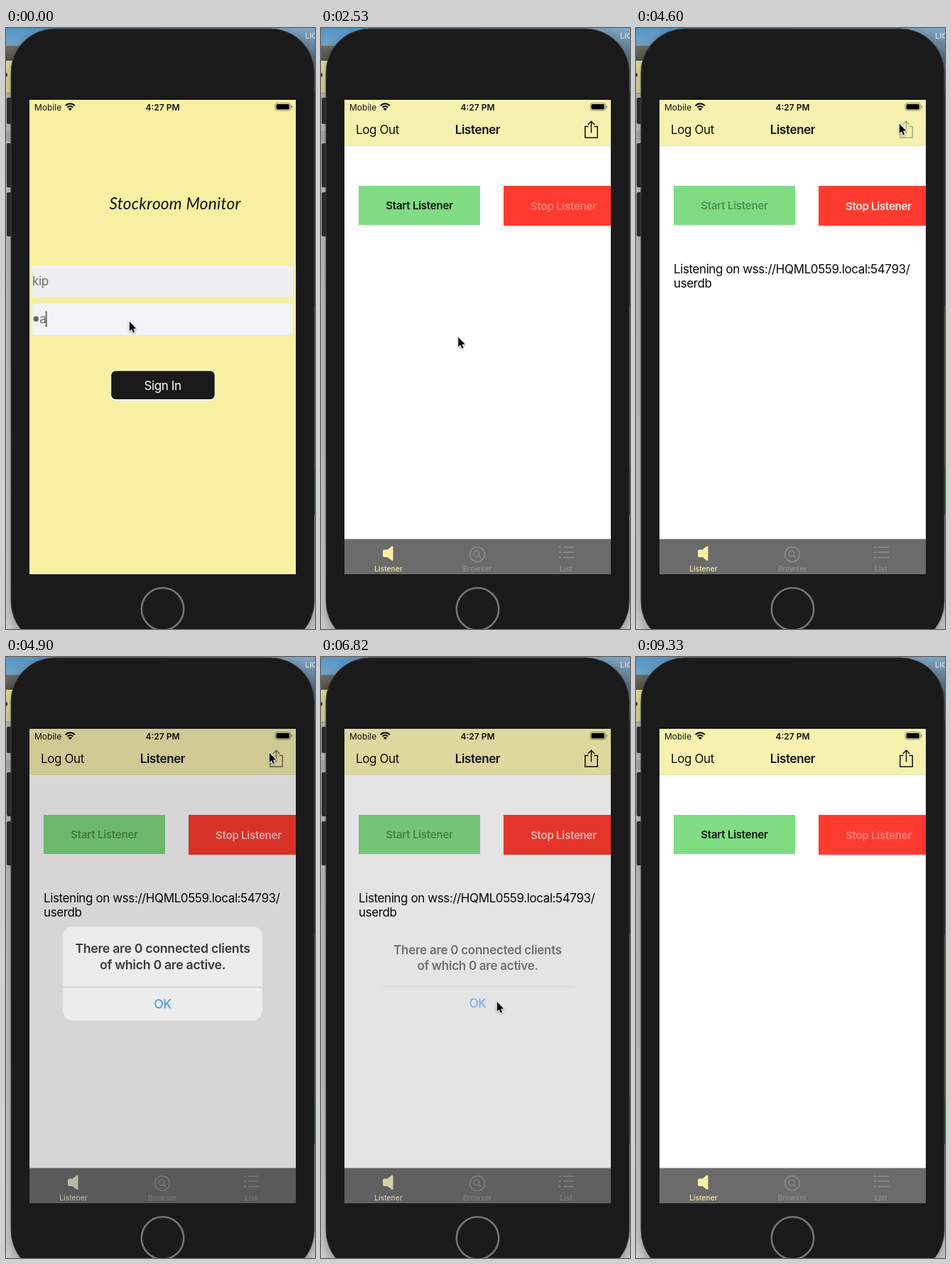
An HTML page with a canvas for the animation above (9430 ms loop, 435 by 845 pixels).

```html
<!DOCTYPE html>
<html lang="en">
<head>
<meta charset="utf-8">
<title>Phone app walkthrough</title>
<style>
html, body { margin: 0; width: 435px; height: 845px; overflow: hidden; background: #c6c6c6; }
canvas { display: block; }
</style>
</head>
<body>
<canvas id="stage" width="435" height="845"></canvas>
<script>
const ctx = document.getElementById('stage').getContext('2d');
const LOOP = 9430;
const SANS = 'Inter, "Open Sans", sans-serif';
const HAND = 'italic 400 22.5px Lato, "Open Sans", sans-serif';

// Cursor moves: start, end, number of steps, target point
const START = [174, 412];
const MOVES = [
  [1340, 1940, 5, [208, 494]],
  [2530, 2820, 3, [152, 263]],
  [4010, 4600, 5, [371, 134]],
  [5480, 6080, 5, [248, 484]],
  [7260, 7700, 4, [348, 231]],
  [8590, 9040, 4, [406, 838]]
];
const PASSWORD = 'password';
const KEY_TIMES = [300, 450, 600, 900, 1050, 1200];

const mix = (a, b, p) => a + (b - a) * p;
const ease = p => p * p * (3 - 2 * p);
const within = (t, a, b) => t >= a && t < b;

function cursorAt(t) {
  let at = START;
  for (const [from, to, steps, goal] of MOVES) {
    if (t < from) break;
    const gap = (to - from) / (steps - 1);
    const step = Math.min(steps, Math.floor((t - from + 5) / gap) + 1);
    const p = ease(step / steps);
    at = [mix(at[0], goal[0], p), mix(at[1], goal[1], p)];
  }
  return at;
}

function rect(x, y, w, h, color) {
  ctx.fillStyle = color;
  ctx.fillRect(x, y, w, h);
}

function round(x, y, w, h, r, color) {
  ctx.beginPath();
  ctx.roundRect(x, y, w, h, r);
  ctx.fillStyle = color;
  ctx.fill();
}

function line(points, color, width) {
  ctx.beginPath();
  points.forEach(([x, y], i) => i ? ctx.lineTo(x, y) : ctx.moveTo(x, y));
  ctx.strokeStyle = color;
  ctx.lineWidth = width;
  ctx.stroke();
}

function ring(x, y, r, color, width) {
  ctx.beginPath();
  ctx.arc(x, y, r, 0, 7);
  ctx.strokeStyle = color;
  ctx.lineWidth = width;
  ctx.stroke();
}

function dot(x, y, r, color) {
  ctx.beginPath();
  ctx.arc(x, y, r, 0, 7);
  ctx.fillStyle = color;
  ctx.fill();
}

function text(str, x, y, size, color, { weight = 400, align = 'left', track = 0, font } = {}) {
  ctx.font = font || `${weight} ${size}px ${SANS}`;
  ctx.letterSpacing = track + 'px';
  ctx.textAlign = align;
  ctx.fillStyle = color;
  ctx.fillText(str, x, y);
}

const body = (str, x, y, color, more) => text(str, x, y, 17, color, { track: -0.4, ...more });

function vertical(y0, y1, ...colors) {
  const g = ctx.createLinearGradient(0, y0, 0, y1);
  colors.forEach((c, i) => g.addColorStop(i / (colors.length - 1), c));
  return g;
}

function desktop() {
  rect(0, 0, 435, 845, vertical(90, 845, '#c6c6c6', '#cfcfcf', '#d8d8d8'));
  rect(0, 0, 220, 25, vertical(0, 25, '#5497c8', '#74a4c8'));
  rect(220, 0, 215, 90, vertical(0, 90, '#7fa6c6', '#5d7183', '#46515c'));
  rect(0, 25, 60, 21, vertical(25, 46, '#706f65', '#55544d'));
  rect(0, 46, 10, 46, '#eae4a0');
  rect(0, 91, 10, 1, '#a5a17c');
  dot(-1, 66, 3, '#111');
  rect(0, 145, 7, 14, '#b8b8b8');
  text('LIC', 421, 15, 11, '#d9dde0', { weight: 600 });
}

function phone() {
  ctx.save();
  ctx.shadowColor = 'rgba(0,0,0,.4)';
  ctx.shadowBlur = 22;
  ctx.shadowOffsetY = 8;
  round(7, 1, 427, 867, 62, '#1a1a1a');
  ctx.restore();
  for (const [y, h] of [[98, 37], [162, 62], [231, 62]]) round(1, y, 10, h, 2, '#2a2a2a');
  round(7, 1, 427, 867, 62, '#1a1a1a');
  ctx.strokeStyle = '#3d4246';
  ctx.lineWidth = 1;
  ctx.stroke();
  rect(434, 90, 1, 300, '#222423');
  rect(434, 390, 1, 230, '#4c4b35');
  rect(434, 620, 1, 65, '#254528');
  ring(220.5, 817, 29.7, '#747474', 2.6);
}

function statusBar() {
  text('Mobile', 40, 115.5, 12, '#111');
  text('4:27 PM', 220.5, 115.5, 12, '#111', { weight: 600, align: 'center' });
  ctx.strokeStyle = '#111';
  ctx.lineWidth = 2.1;
  for (const r of [5.3, 8.9]) {
    ctx.beginPath();
    ctx.arc(90.3, 115.3, r, -Math.PI * 0.76, -Math.PI * 0.24);
    ctx.stroke();
  }
  ctx.beginPath();
  ctx.moveTo(90.3, 116.2);
  ctx.arc(90.3, 116.2, 3.6, -Math.PI * 0.76, -Math.PI * 0.24);
  ctx.fillStyle = '#111';
  ctx.fill();
  ctx.beginPath();
  ctx.roundRect(379, 105.5, 21.5, 10.5, 3);
  ctx.strokeStyle = 'rgba(0,0,0,.4)';
  ctx.lineWidth = 1;
  ctx.stroke();
  round(380.5, 107, 18.5, 7.5, 1.8, '#000');
  round(401.5, 109, 1.4, 3.6, 0.7, 'rgba(0,0,0,.45)');
}

function signIn(t) {
  rect(33, 101, 375, 667, '#f7f0a3');
  statusBar();
  text('Stockroom Monitor', 238, 255, 0, '#111', { font: HAND, align: 'center', track: 0.3 });
  rect(37, 334, 367, 44, '#efeef3');
  rect(37, 388, 366, 44, '#f3f2f7');
  body('kip', 37, 362, '#6b6b6b');

  const hidden = 1 + KEY_TIMES.filter(k => t >= k).length;
  for (let i = 0; i < hidden; i++) dot(42.3 + i * 10.2, 409, 3.8, '#666');
  const x = 37 + hidden * 10.2;
  body(PASSWORD[hidden], x, 415, '#6b6b6b');
  if (t < 1640) rect(x + ctx.measureText(PASSWORD[hidden]).width - 0.7, 398, 2, 22, '#666');

  round(147.5, 481.5, 147, 42.5, 7, '#fff');
  round(148.2, 482.2, 145.5, 39.8, 6, '#1a1a1a');
  body('Sign In', 220.5, 508.5, '#fff', { align: 'center' });
}

function shareIcon(color) {
  line([[376.5, 138.5], [371.8, 138.5], [371.8, 154.2], [389.2, 154.2], [389.2, 138.5], [384.5, 138.5]], color, 1.5);
  line([[380.5, 147.5], [380.5, 131.5]], color, 1.5);
  line([[375.8, 136], [380.5, 131.2], [385.2, 136]], color, 1.5);
}

function tabBar(tint) {
  rect(33, 718.5, 375, 49.5, '#6b6b6b');
  ctx.beginPath();
  ctx.moveTo(89, 733.5);
  ctx.lineTo(93.5, 733.5);
  ctx.lineTo(99.5, 728.8);
  ctx.quadraticCurveTo(101.5, 727.8, 101.5, 730);
  ctx.lineTo(101.5, 747.5);
  ctx.quadraticCurveTo(101.5, 749.8, 99.5, 748.6);
  ctx.lineTo(93.5, 744);
  ctx.lineTo(89, 744);
  ctx.quadraticCurveTo(87, 744, 87, 742);
  ctx.lineTo(87, 735.5);
  ctx.quadraticCurveTo(87, 733.5, 89, 733.5);
  ctx.fillStyle = tint;
  ctx.fill();

  const grey = '#8f8f8f';
  ring(220, 740, 10.4, grey, 1.4);
  ring(219, 739, 3.9, grey, 1.3);
  line([[221.8, 741.8], [225, 745]], grey, 1.4);
  for (const y of [730, 737, 744.5]) {
    line([[335, y], [338, y]], grey, 1.8);
    line([[341, y], [356, y]], grey, 1.5);
  }
  const label = { weight: 500, align: 'center', track: 0.1 };
  text('Listener', 95, 764, 10, tint, label);
  text('Browser', 220, 764, 10, grey, label);
  text('List', 345, 764, 10, grey, label);
}

// Dim amount, scale and opacity of the alert
function alertState(t) {
  if (!within(t, 4900, 6960)) return null;
  if (t < 5050) return { dim: 0.16, scale: 1.04, panel: 0.6, ink: 0.8 };
  if (t < 5190) return { dim: 0.19, scale: 1.01, panel: 0.72, ink: 0.95 };
  if (t < 6820) return { dim: 0.2, scale: 1, panel: 0.78, ink: 1 };
  return { dim: 0.105, scale: 1, panel: 0, ink: 0.55 };
}

function alertBox(s, pressed) {
  rect(33, 101, 375, 667, `rgba(0,0,0,${s.dim})`);
  ctx.save();
  ctx.translate(220.5, 445);
  ctx.scale(s.scale, s.scale);
  if (s.panel) {
    round(-135, -63.5, 270, 127, 13, `rgba(250,252,251,${s.panel})`);
    if (pressed) round(-135, 18.5, 270, 45, [0, 0, 13, 13], 'rgba(0,0,0,.08)');
  }
  rect(-135, 18, 270, 0.8, s.panel ? 'rgba(60,60,67,.32)' : 'rgba(60,60,67,.1)');
  ctx.globalAlpha = s.ink;
  const bold = { weight: 600, align: 'center', track: -0.27 };
  const ink = s.panel ? '#0c0c0c' : '#111';
  body('There are 0 connected clients', 0, -27.5, ink, bold);
  body('of which 0 are active.', 0, -5.5, ink, bold);
  body('OK', 0, 47.5, '#067afb', { align: 'center' });
  ctx.restore();
}

function listener(t) {
  const alert = alertState(t);
  const faded = alert && alert.panel > 0;
  const listening = within(t, 3260, 8000);

  rect(33, 101, 375, 667, '#fff');
  rect(33, 101, 375, 64.5, '#f7f1b0');
  rect(33, 165, 375, 0.5, '#d0cc9c');
  statusBar();
  body('Log Out', 49, 149, '#111');
  body('Listener', 220.5, 149, '#111', { weight: 600, align: 'center' });
  shareIcon(faded ? '#77734f' : within(t, 4600, 4900) ? 'rgba(0,0,0,.3)' : '#111');

  const label = { weight: 600, align: 'center', track: -0.23 };
  rect(53, 222, 171, 55, '#80dc83');
  text('Start Listener', 138.5, 255, 15, within(t, 3110, 8000) ? 'rgba(0,40,0,.4)' : '#0c130c', label);
  rect(257, 222, 151, 56, '#ff3b30');
  const stopAlpha = within(t, 7850, 8000) ? 0.18 : !listening ? 0.36 : alert ? 0.74 : 0.9;
  text('Stop Listener', 341.5, 255.5, 15, `rgba(255,255,255,${stopAlpha})`, label);

  if (listening) {
    body('Listening on wss://HQML0559.local:54793/', 53, 345, '#0a0a0a');
    body('userdb', 53, 365, '#0a0a0a');
  }
  tabBar(faded ? '#dcdcc8' : alert ? '#eee9b8' : '#f7f0a3');
  if (alert) alertBox(alert, within(t, 6380, 6530));
}

function cursor([x, y]) {
  const shape = [[0, 0], [0, 13.6], [3, 10.8], [5.2, 15.8], [7.4, 14.8], [5.3, 10], [9.5, 9.8]];
  ctx.save();
  ctx.translate(x - 0.2, y + 0.7);
  ctx.beginPath();
  shape.forEach(p => ctx.lineTo(...p));
  ctx.closePath();
  ctx.lineJoin = 'round';
  ctx.shadowColor = 'rgba(0,0,0,.35)';
  ctx.shadowBlur = 2;
  ctx.shadowOffsetY = 1;
  ctx.strokeStyle = '#fff';
  ctx.lineWidth = 2;
  ctx.stroke();
  ctx.shadowColor = 'transparent';
  ctx.fillStyle = '#000';
  ctx.fill();
  ctx.restore();
}

function draw(t) {
  desktop();
  phone();
  ctx.save();
  ctx.beginPath();
  ctx.rect(33, 101, 375, 667);
  ctx.clip();
  if (t < 2080) signIn(t); else listener(t);
  ctx.restore();
  if (t < 9330) cursor(cursorAt(t));
}

const begun = performance.now();
function tick() {
  draw((performance.now() - begun) % LOOP);
  requestAnimationFrame(tick);
}
tick();
</script>
</body>
</html>
```
